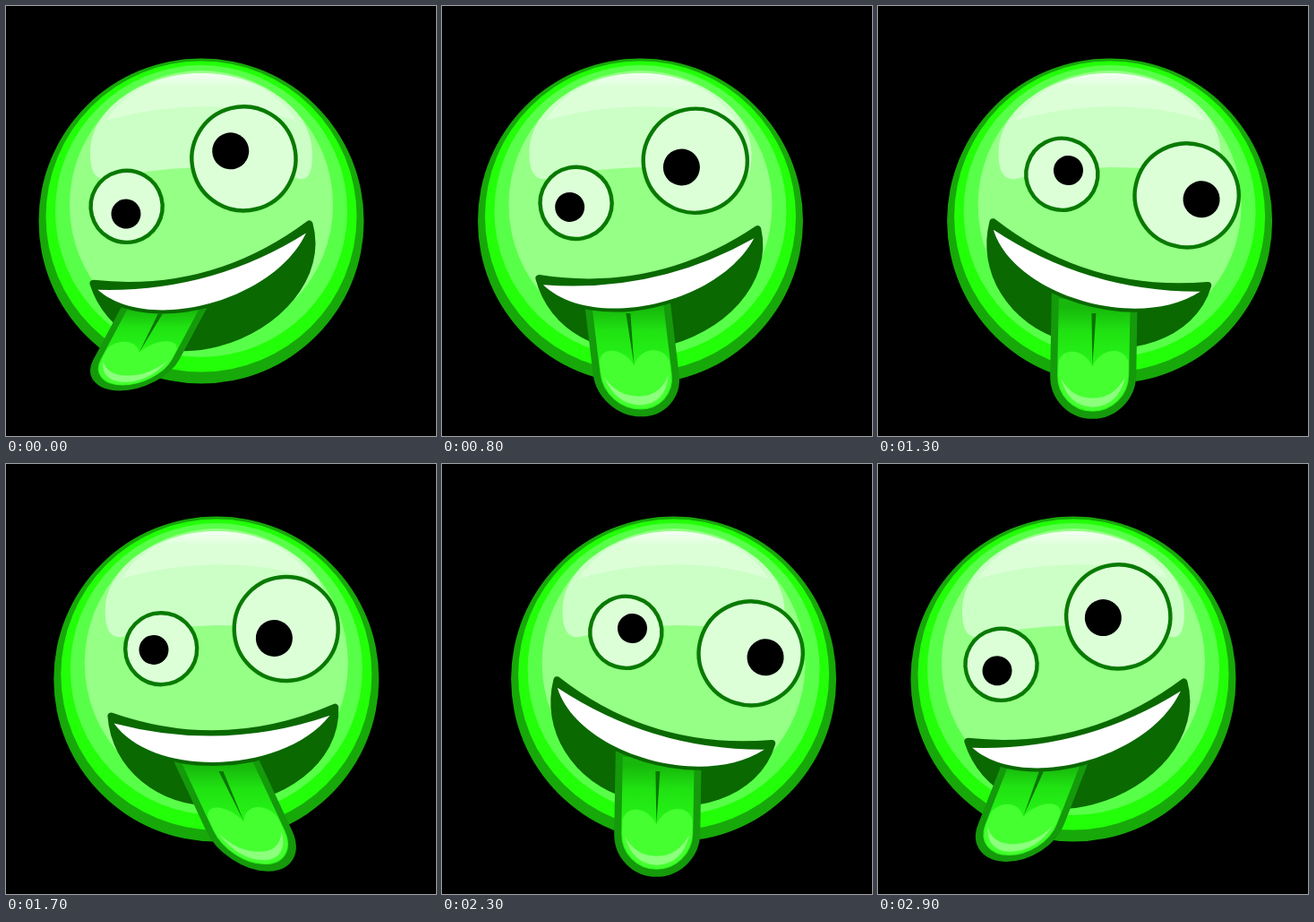
Recreate the animation shown at these times as an HTML page. Size 480 by 480 pixels, loop 3 s.

```html
<!DOCTYPE html>
<html lang="en">
<head>
<meta charset="utf-8">
<title>Zany face</title>
<style>
  html, body { margin: 0; width: 100%; height: 100%; overflow: hidden; background: #000; }
  svg { display: block; width: 100%; height: 100%; }
  .eye { fill: #dcffd8; stroke: #087a00; stroke-width: 4.4; }
  .lips { fill: #0a6900; stroke: #0a6900; stroke-width: 8; stroke-linejoin: round; }
</style>
</head>
<body>
<svg viewBox="0 0 480 480">
  <defs>
    <linearGradient id="shine" x2="0" y2="1">
      <stop offset="0" stop-color="#f4fff2"/>
      <stop offset=".3" stop-color="#dcffd8"/>
    </linearGradient>
    <linearGradient id="flesh" x2="0" y2="1">
      <stop offset=".1" stop-color="#17b80b"/>
      <stop offset=".3" stop-color="#20e212"/>
      <stop offset=".6" stop-color="#26f616"/>
    </linearGradient>
  </defs>

  <g id="head">
    <circle cy="240" r="181.5" fill="#17a909"/>
    <circle cy="235" r="173.5" fill="#22ff08"/>
    <circle cy="229" r="163" fill="#58ff48"/>
    <ellipse cy="222" rx="147" ry="150" fill="#95ff86"/>
    <path fill="#ccffc6" d="M-124 165C-124 110-60 75 0 75S124 110 124 165Q124 196 110 193Q60 180 0 180Q-60 182-105 193Q-124 196-124 165Z"/>
    <path fill="url(#shine)" d="M-106 128C-85 94-45 75 0 75S85 94 106 128Q60 112 0 112Q-60 114-106 128Z"/>
  </g>

  <g id="face">
    <circle class="eye" cx="-67.5" cy="-72" r="40"/>
    <circle class="eye" cx="72.5" cy="-91" r="58"/>
    <circle id="pupilL" r="16.5"/>
    <circle id="pupilR" r="20.5"/>
    <path class="lips" d="M-125 2Q0 49 125-2C126 58 62 101-8 101C-74 101-122 58-125 2Z"/>
  </g>

  <g id="tongue">
    <path fill="url(#flesh)" stroke="#149a0a" stroke-width="8" d="M-44-22V67A44 44 0 0 0 44 67V-22Z"/>
    <path fill="#45ff30" d="M-39 52C-34 34-10 38-1 57C8 36 34 34 39 52V67A39 39 0 0 1-39 67Z"/>
    <path fill="#8cff7d" d="M-36 70Q-27 101 0 102Q29 101 36 68Q24 92 0 92Q-24 92-36 70Z"/>
    <path fill="#0a7400" d="M-3-2H2L-1 56Z"/>
  </g>

  <g id="smile">
    <path class="lips" d="M-122 10Q0 45 119 7C65 72-80 72-122 10Z"/>
    <path fill="#fff" d="M-122 10Q0 45 119 7C65 72-80 72-122 10Z"/>
  </g>
</svg>
<script>
  const STEP = 100, BEATS = 10;
  const RAD = Math.PI / 180;
  const get = id => document.getElementById(id);
  const move = (id, transform) => get(id).setAttribute('transform', transform);

  function ease(x) {
    x = Math.min(1, Math.max(0, x));
    return x * x * (3 - 2 * x);
  }

  // Rises from 0 to 1, then falls back, each over its own span of beats
  const swing = (beat, rise, riseSpan, fall, fallSpan) =>
    ease((beat - rise) / riseSpan) - ease((beat - fall) / fallSpan);

  function look(id, x, y, reach, degrees) {
    const angle = degrees * RAD;
    move(id, `translate(${x + reach * Math.cos(angle)} ${y + reach * Math.sin(angle)})`);
  }

  function draw() {
    const beat = Math.floor(performance.now() / STEP) % BEATS;
    const turn = 360 / BEATS * beat;
    const wave = (shift = 0, speed = 1) => Math.cos((turn - shift) * speed * RAD);

    const sway = swing(beat, .5, 3.1, 4.6, 4.1);
    const tilt = -14.5 + 35.3 * sway;
    const faceX = 218 + 39 * swing(beat, .5, 3.6, 5, 4.8);
    const pose = `translate(${faceX} 276.6) rotate(${tilt})`;
    move('head', `translate(${218 + 45 * sway} 0)`);
    move('face', pose);
    move('smile', pose);

    const lean = -.55 + 1.02 * swing(beat, -.5, 6.8, 6.9, 2.8);
    const stretch = .88 + .12 * wave(101, 2) - .035 * wave();
    move('tongue', `matrix(1 0 ${lean * stretch} ${stretch} ${225 - 53 * wave()} 345)`);

    look('pupilL', -67.5, -72, 8.3, 76 - turn + 20 * wave(22) - tilt);
    look('pupilR', 72.5, -91, 17, 247 + turn - 38 * wave(-14) - tilt);
    requestAnimationFrame(draw);
  }
  draw();
</script>
</body>
</html>
```
